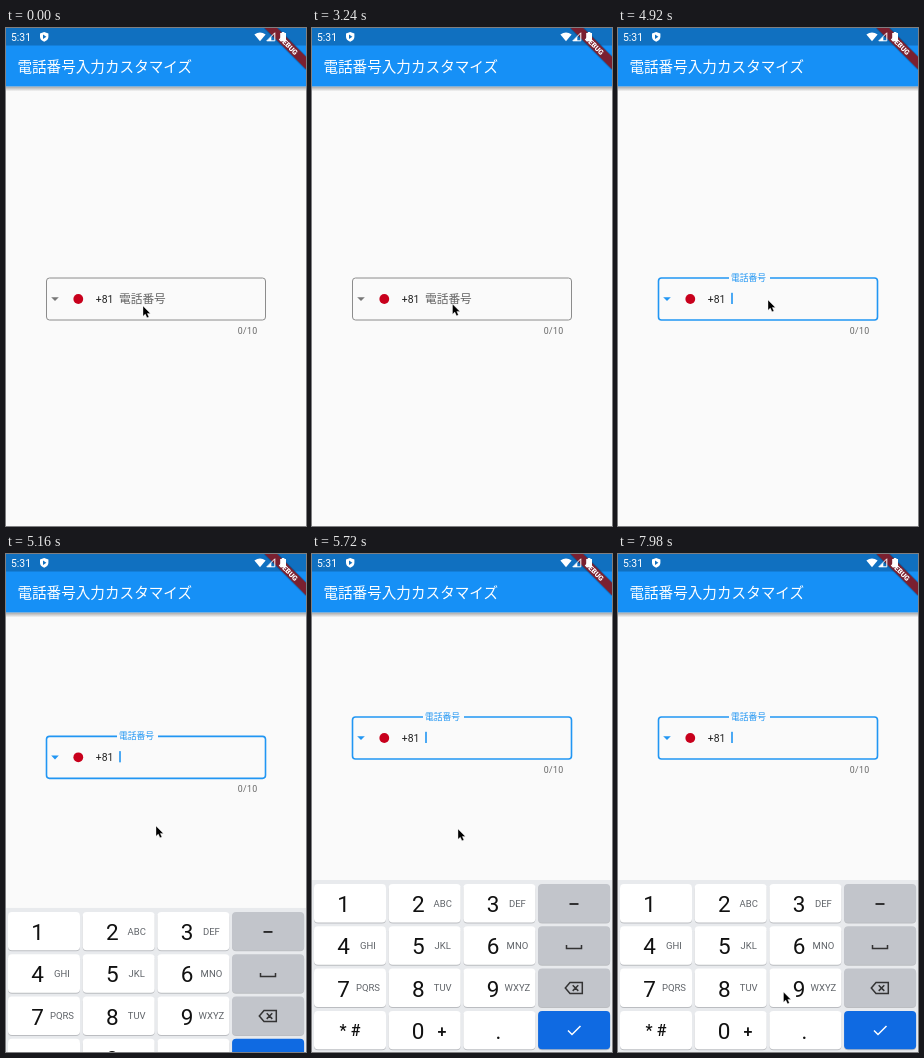
An HTML page for the animation above (8 s loop, 300 by 498 pixels).

```html
<!DOCTYPE html>
<html lang="ja">
<head>
<meta charset="utf-8">
<style>
  html, body { margin: 0; width: 100%; height: 100%; overflow: hidden; background: #fafafa; }
  svg { display: block; width: 100%; height: 100%; font-family: Roboto, sans-serif; }
  .jp { font-family: "Noto Sans CJK JP", "Noto Sans CJK", sans-serif; }
</style>
</head>
<body>
<svg viewBox="0 0 300 498">
  <defs>
    <linearGradient id="shade" x2="0" y2="1">
      <stop stop-color="#000" stop-opacity=".35"/>
      <stop offset="1" stop-color="#000" stop-opacity="0"/>
    </linearGradient>
  </defs>
  <rect width="300" height="498" fill="#fafafa"/>

  <g id="field">
    <path id="border" fill="none"/>
    <path id="arrow" d="M45.2 269.2h7.6l-3.8 3.9z"/>
    <circle cx="72.3" cy="271" r="4.9" fill="#c8001c"/>
    <text x="89.8" y="274.6" font-size="10.4" fill="#222">+81</text>
    <text id="label" class="jp" font-size="11.7" y="4.45">電話番号</text>
    <rect id="caret" x="113.2" y="264.8" width="1.6" height="11.2" fill="#2196f3"/>
    <text x="231.8" y="306" font-size="8.8" letter-spacing=".3" fill="#666">0/10</text>
  </g>

  <rect y="58.4" width="300" height="5" fill="url(#shade)"/>
  <rect width="300" height="58.4" fill="#1690f6"/>
  <rect width="300" height="17.5" fill="#1070c0"/>
  <text class="jp" x="11.4" y="44" font-size="14.6" fill="#fff">電話番号入力カスタマイズ</text>

  <g transform="translate(300 0) rotate(45)">
    <rect x="-29.2" y="19.4" width="58.4" height="10.8" fill="#000" opacity=".2"/>
    <rect x="-29.2" y="20.4" width="58.4" height="8.8" fill="#7a2030"/>
    <text y="27.4" font-size="7.2" font-weight="900" text-anchor="middle" fill="#fff">DEBUG</text>
  </g>

  <g fill="#fff">
    <text x="5" y="12.8" font-size="10.4">5:31</text>
    <path d="M38.2 4l4.2 1.6v3.2q0 3.4-4.2 5q-4.2-1.6-4.2-5V5.6z"/>
    <path d="M37 6.6l3.4 2.2l-3.4 2.2z" fill="#1070c0"/>
    <path d="M248.4 6.4q5.6-4 11.2 0L254 13.2z"/>
    <path d="M268.8 4.8v8h-8z" fill="none" stroke="#fff"/>
    <path d="M265.3 8.6v4.4h-4.4z"/>
    <path d="M275.8 4h2.6v1h1.6v8.2h-5.8V5h1.6z"/>
  </g>

  <g id="keyboard"></g>

  <path id="pointer" d="M0 0V10.2L2.3 8.1L4 11.8L5.9 10.9L4.3 7.4H7.4Z"
        fill="#000" stroke="#fff" stroke-width=".5" stroke-opacity=".7"/>
</svg>

<script>
const LOOP = 8000;
const $ = id => document.getElementById(id);
const clamp = v => Math.min(1, Math.max(0, v));
const mix = (a, b, p) => a + (b - a) * p;
const rgb = (a, b, p) => `rgb(${a.map((v, i) => Math.round(mix(v, b[i], p)))})`;
const grey = [140, 140, 140], dim = [100, 100, 100], blue = [33, 150, 243];

// cubic-bezier(.4, 0, .2, 1)
function ease(x) {
  let lo = 0, hi = 1, s;
  for (let i = 0; i < 20; i++) {
    s = (lo + hi) / 2;
    if (1.2 * s * (1 - s) ** 2 + .6 * s * s * (1 - s) + s ** 3 < x) lo = s; else hi = s;
  }
  return 3 * s * s * (1 - s) + s ** 3;
}
const tween = (t, start, length) => ease(clamp((t - start) / length));

// time, x, y of the pointer
const track = [
  [0, 137, 278], [2500, 137, 278], [3200, 140.5, 276], [3340, 140.5, 276],
  [4060, 150, 272], [5200, 150, 272], [5700, 146, 275], [6000, 145, 278],
  [6740, 115, 448], [7020, 118.5, 453.5], [7300, 119, 454], [7900, 165.5, 438], [8000, 165.5, 438]
];

function pointerAt(t) {
  const i = track.findIndex(k => k[0] > t);
  const [t0, x0, y0] = track[i - 1], [t1, x1, y1] = track[i];
  const u = (t - t0) / (t1 - t0), p = u * u * (3 - 2 * u);
  return [mix(x0, x1, p), mix(y0, y1, p)];
}

function buildKeyboard() {
  const letters = ["", "ABC", "DEF", "GHI", "JKL", "MNO", "PQRS", "TUV", "WXYZ"];
  const text = (s, x, y, size, color = "#111", weight = 400) =>
    `<text x="${x}" y="${y}" font-size="${size}" font-weight="${weight}" text-anchor="middle" fill="${color}">${s}</text>`;
  let out = '<rect y="326" width="300" height="174" fill="#e8eaed"/>';
  for (let row = 0; row < 4; row++) for (let col = 0; col < 4; col++) {
    const x = 2 + col * 74.7, y = 330 + row * 42.3;
    const fill = col < 3 ? "#fff" : row < 3 ? "#c2c5cb" : "#0f6ae2";
    const key = (dy, color) =>
      `<rect x="${x}" y="${y + dy}" width="72" height="38.4" rx="4" fill="${color}"/>`;
    out += key(1, "#bbbdc1") + key(0, fill);
    if (col < 3 && row < 3) {
      const n = row * 3 + col;
      out += text(n + 1, x + 29.7, y + 28, 22.5) + text(letters[n], x + 54, y + 22.7, 9.5, "#5f6368");
    }
  }
  out += text("* #", 38, 482, 16, "#111", 500) + text("0", 106, 485, 22.5)
    + text("+", 130, 483, 16, "#111", 500) + text(".", 186.5, 484.5, 22);
  const icon = (d, color, width) => `<path d="${d}" fill="none" stroke="${color}" stroke-width="${width}"/>`;
  out += icon("M257.5 350H266.5", "#222", 1.8)
    + icon("M254.5 391V394.5H269.5V391", "#333", 1.5)
    + icon("M258 428.5H270.3V439.5H258L253.3 434ZM260.7 431.3L266.3 436.9M266.3 431.3L260.7 436.9", "#333", 1.5)
    + icon("M256 476.5L260 480.5L268.5 472", "#fff", 1.5);
  $("keyboard").innerHTML = out;
}

function caretOn(t) {
  if (t < 4690) return false;
  return t < 5500 ? t < 5190 : (t - 5500) % 1000 < 500;
}

function draw(t) {
  const focus = tween(t, 4686, 200);
  const slide = tween(t, 5002, 285);
  const lift = tween(t, 5018, 285);

  $("field").setAttribute("transform", `translate(0 ${-87 * lift})`);
  const border = $("border");
  border.setAttribute("d", `M${111 + 41 * focus} 250H256.5a3 3 0 0 1 3 3V289a3 3 0 0 1-3 3`
    + "H43.5a3 3 0 0 1-3-3V253a3 3 0 0 1 3-3H111");
  border.setAttribute("stroke", rgb(grey, blue, focus));
  border.setAttribute("stroke-width", mix(1, 1.6, focus));

  const label = $("label");
  label.setAttribute("transform", `translate(113 ${mix(270.2, 249.6, focus)}) scale(${mix(1, .75, focus)})`);
  label.setAttribute("fill", rgb(dim, blue, clamp(focus * 1.5 - .4)));
  $("arrow").setAttribute("fill", t < 4690 ? "#777" : "#2196f3");
  $("caret").setAttribute("visibility", caretOn(t) ? "visible" : "hidden");

  $("keyboard").setAttribute("transform", `translate(0 ${174 * (1 - slide)})`);
  $("pointer").setAttribute("transform", `translate(${pointerAt(t)})`);
}

buildKeyboard();
function frame() {
  draw(performance.now() % LOOP);
  requestAnimationFrame(frame);
}
frame();
</script>
</body>
</html>
```
